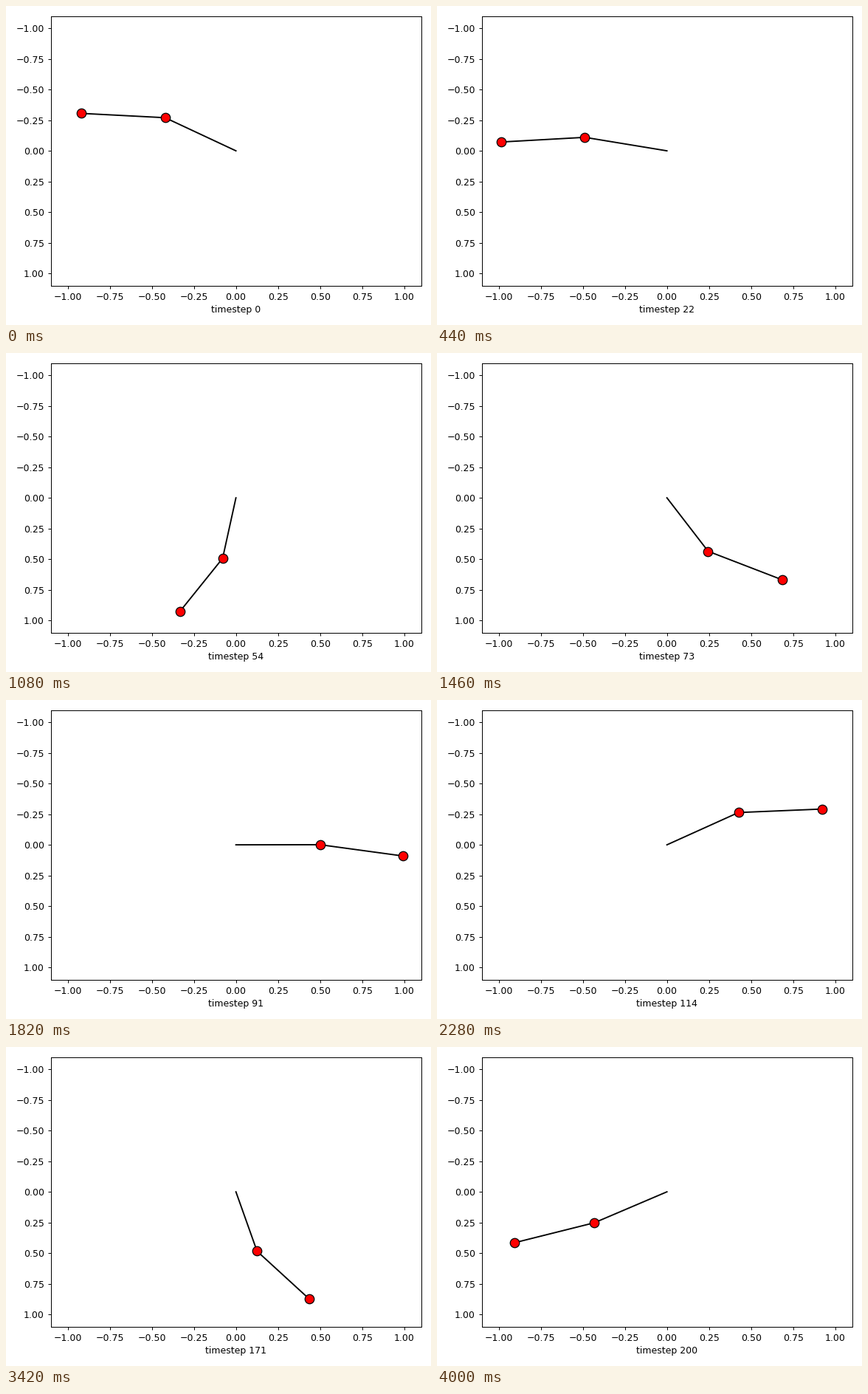
Animation, 576 px wide and 432 px high, one loop 4020 ms. Source, as a matplotlib script:

```python
import numpy as np
import matplotlib.pyplot as plt
from matplotlib.animation import FuncAnimation

FRAMES = 201
INTERVAL = 20        # ms per frame
DT = 0.01            # simulated seconds per frame
SUBSTEPS = 5
G, L = 9.81, 0.5     # gravity, length of each link


def deriv(state):
    """Double pendulum, equal point masses, angles measured from upright."""
    a, b, wa, wb = state
    c, s = np.cos(a - b), np.sin(a - b)
    ra = 2 * G / L * np.sin(a) - s * wb**2
    rb = G / L * np.sin(b) + s * wa**2
    acc_a = (ra - c * rb) / (2 - c**2)
    return np.array([wa, wb, acc_a, rb - c * acc_a])


def rk4(state, h):
    k1 = deriv(state)
    k2 = deriv(state + h / 2 * k1)
    k3 = deriv(state + h / 2 * k2)
    k4 = deriv(state + h * k3)
    return state + h / 6 * (k1 + 2 * k2 + 2 * k3 + k4)


def simulate(state):
    states = [state]
    for _ in range(FRAMES - 1):
        for _ in range(SUBSTEPS):
            state = rk4(state, DT / SUBSTEPS)
        states.append(state)
    return np.array(states)


angles = simulate(np.array([1.0, 1.5, 0.0, 0.0]))[:, :2]
# Column 0 is the pivot, then both joints; the y axis points down.
zeros = np.zeros((FRAMES, 1))
xs = np.hstack([zeros, np.cumsum(-L * np.sin(angles), axis=1)])
ys = np.hstack([zeros, np.cumsum(-L * np.cos(angles), axis=1)])

plt.rcParams["font.family"] = "DejaVu Sans"
fig, ax = plt.subplots(figsize=(6.4, 4.8), dpi=90)
ax.set_xlim(-1.1, 1.1)
ax.set_ylim(1.1, -1.1)
ax.set_xlabel("timestep 0")
arm, = ax.plot(xs[0], ys[0], "k-", lw=1.5, marker="o", markevery=[1, 2],
               ms=10, mfc="red", mec="black", mew=1)
fig.tight_layout()


def update(i):
    arm.set_data(xs[i], ys[i])
    ax.set_xlabel(f"timestep {i}")
    return arm,


anim = FuncAnimation(fig, update, frames=FRAMES, interval=INTERVAL,
                     repeat=True, repeat_delay=0, blit=False)
plt.show()
```
